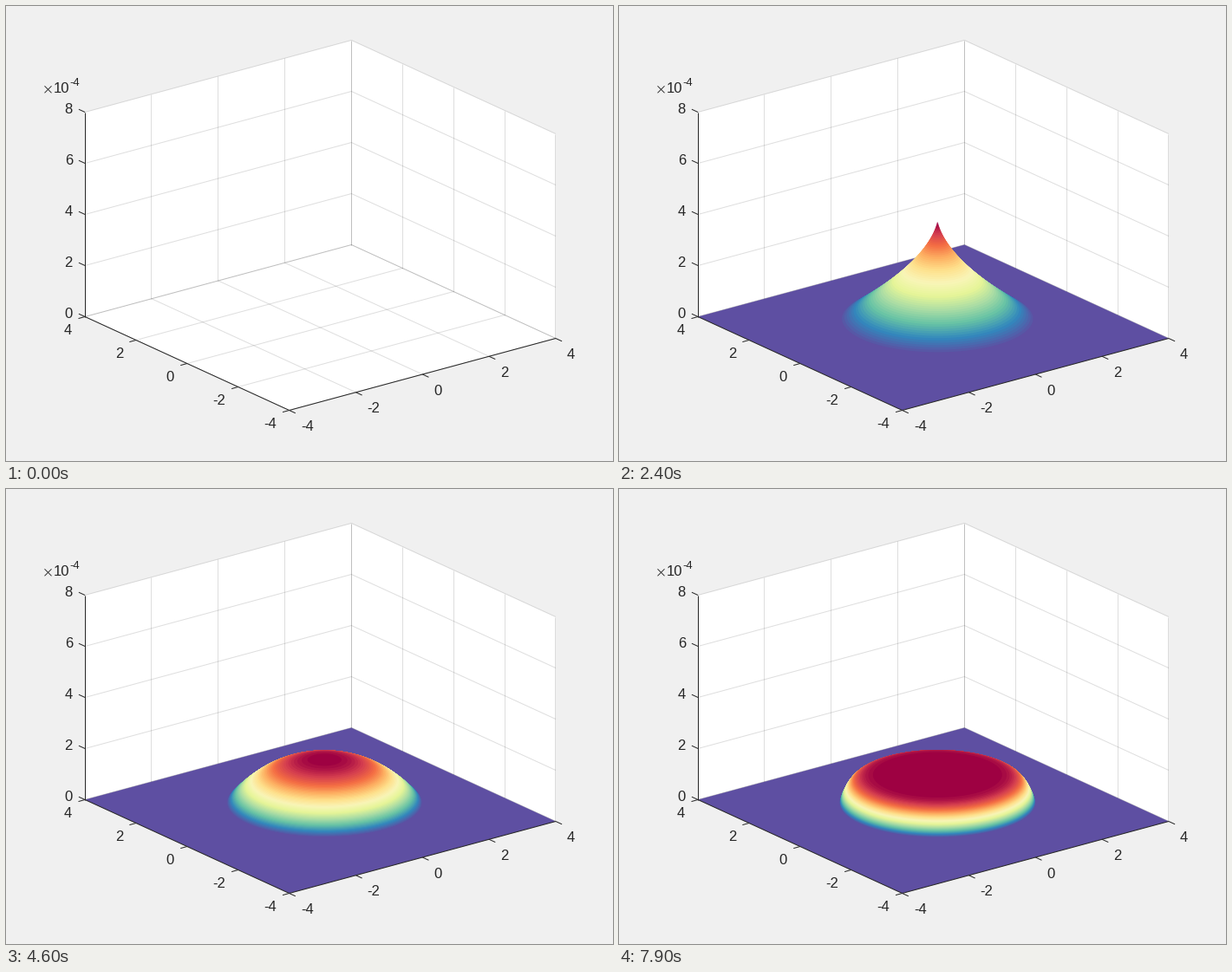
Animation of 700 by 525 pixels, one loop 8000 ms. Source, as a matplotlib script:

```python
import numpy as np
import matplotlib
matplotlib.rcParams["toolbar"] = "None"
import matplotlib.pyplot as plt
from matplotlib.animation import FuncAnimation
from matplotlib.collections import PolyCollection
from matplotlib.colors import LinearSegmentedColormap

W, H, DPI = 700, 525, 100
PX = 72 / DPI                      # one pixel in points
INK = (0.15, 0.15, 0.15)
TICKS = (-4, -2, 0, 2, 4)
FRAMES, HALF = 80, 40

# projected axis directions, in pixels per unit
FLOOR = np.array([362.5, 371.0])
EX = np.array([38.41, -10.375])
EY = np.array([-29.44, -13.5])
EZ = np.array([0, -29.5])          # per 1e-4

# bump: projected centre, radii of its base, height scale, smallest sampled radius
CX, CY = 367.3, 362.4
RX, RY = 112.9, 39.7
BASE, RHO0 = 27.6, 0.0054
ZMAX = 236
LEVELS, SUB = 64, 4

SPECTRAL = LinearSegmentedColormap.from_list("spec", [
    "#5e4fa2", "#3288bd", "#66c2a5", "#abdda4", "#e6f598", "#f9f5b8",
    "#fee08b", "#fdae61", "#f46d43", "#d53e4f", "#9e0142"], N=LEVELS)


def project(x, y, z=0):
    return FLOOR + x * EX + y * EY + z * EZ


fig = plt.figure(figsize=(W / DPI, H / DPI), dpi=DPI, facecolor="#f0f0f0")
ax = fig.add_axes([0, 0, 1, 1])
ax.set_xlim(0, W)
ax.set_ylim(H, 0)
ax.axis("off")


def line(a, b, color=INK, alpha=1.0, z=1, width=1.0):
    xs = np.array([a[0], b[0]])
    if xs[0] == xs[1]:
        xs = np.floor(xs)          # upright lines fill the pixel column they fall in
    ax.plot(xs, [a[1], b[1]], color=color, alpha=alpha,
            lw=width * PX, zorder=z, solid_capstyle="butt")


def face(corners, color, z):
    return ax.fill(*np.array(corners).T, color=color, lw=0, zorder=z)[0]


def label(x, y, s, ha="left", size=16.67):
    ax.text(x, y, s, ha=ha, va="baseline", color=INK, zorder=6,
            fontfamily="Liberation Sans", fontsize=size * PX)


def grid(a, b):
    line(a, b, alpha=0.15)


ground = [project(-4, -4), project(4, -4), project(4, 4), project(-4, 4)]
face(ground, "white", 0)
face([project(-4, 4), project(4, 4), project(4, 4, 8), project(-4, 4, 8)], "white", 0)
face([project(4, -4), project(4, 4), project(4, 4, 8), project(4, -4, 8)], "white", 0)

for t in TICKS:
    grid(project(t, -4), project(t, 4))
    grid(project(-4, t), project(4, t))
    grid(project(t, 4), project(t, 4, 8))
    grid(project(4, t), project(4, t, 8))
    z = t + 4
    grid(project(-4, 4, z), project(4, 4, z))
    grid(project(4, -4, z), project(4, 4, z))

# axis lines, ticks and labels
line(project(-4, -4), project(4, -4), z=5)
line(project(-4, -4), project(-4, 4), z=5)
line(project(-4, 4), project(-4, 4, 8), z=5)
for t in TICKS:
    px, py, pz = project(t, -4), project(-4, t), project(-4, 4, t + 4)
    line(px, px + (7.2, 3.3), z=5)
    line(py, py + (-7.6, 2.1), z=5)
    line(pz, pz + (-7.2, -3.3), z=5)
    label(px[0] + 13.2, px[1] + 23.55, str(t))
    label(py[0] - 14.9, py[1] + 20.9, str(t), "right")
    label(77, pz[1] + 1.3, str(t + 4), "right")

line((44.5, 92.3), (52.5, 100.3), z=6, width=0.9)
line((44.5, 100.3), (52.5, 92.3), z=6, width=0.9)
label(54.7, 100.2, "10")
label(73.3, 91.7, "-4", size=13)

floor = face(ground, SPECTRAL(0), 2)
discs = PolyCollection([], edgecolors="none", linewidths=0, zorder=3)
ax.add_collection(discs)

N = LEVELS * SUB
steps = np.arange(1, N + 1)
shades = SPECTRAL(np.minimum(steps // SUB, LEVELS - 1))
angle = np.linspace(0, 2 * np.pi, 120, endpoint=False)


def power(k):
    if k < HALF:
        return k / (HALF - 1)
    return 1 + 9 * (k - HALF) / (HALF - 1)


def draw(k):
    p = power(k)
    floor.set_visible(p > 0)
    discs.set_visible(p > 0)
    if p > 0:
        # stacked horizontal slices of 1 - rho^p, scaled to unit volume
        v = (1 - RHO0 ** p) * steps / N
        rho = (1 - v) ** (1 / p)
        height = BASE * (p + 2) / p * v
        keep = height <= ZMAX
        rho, height = rho[keep, None], height[keep, None]
        x = CX + RX * rho * np.cos(angle)
        y = CY - height + RY * rho * np.sin(angle)
        discs.set_verts(np.stack([x, y], axis=-1))
        discs.set_facecolor(shades[keep])
    return floor, discs


anim = FuncAnimation(fig, draw, frames=FRAMES, interval=100,
                     init_func=lambda: draw(0), repeat=True, repeat_delay=0)
plt.show()
```
